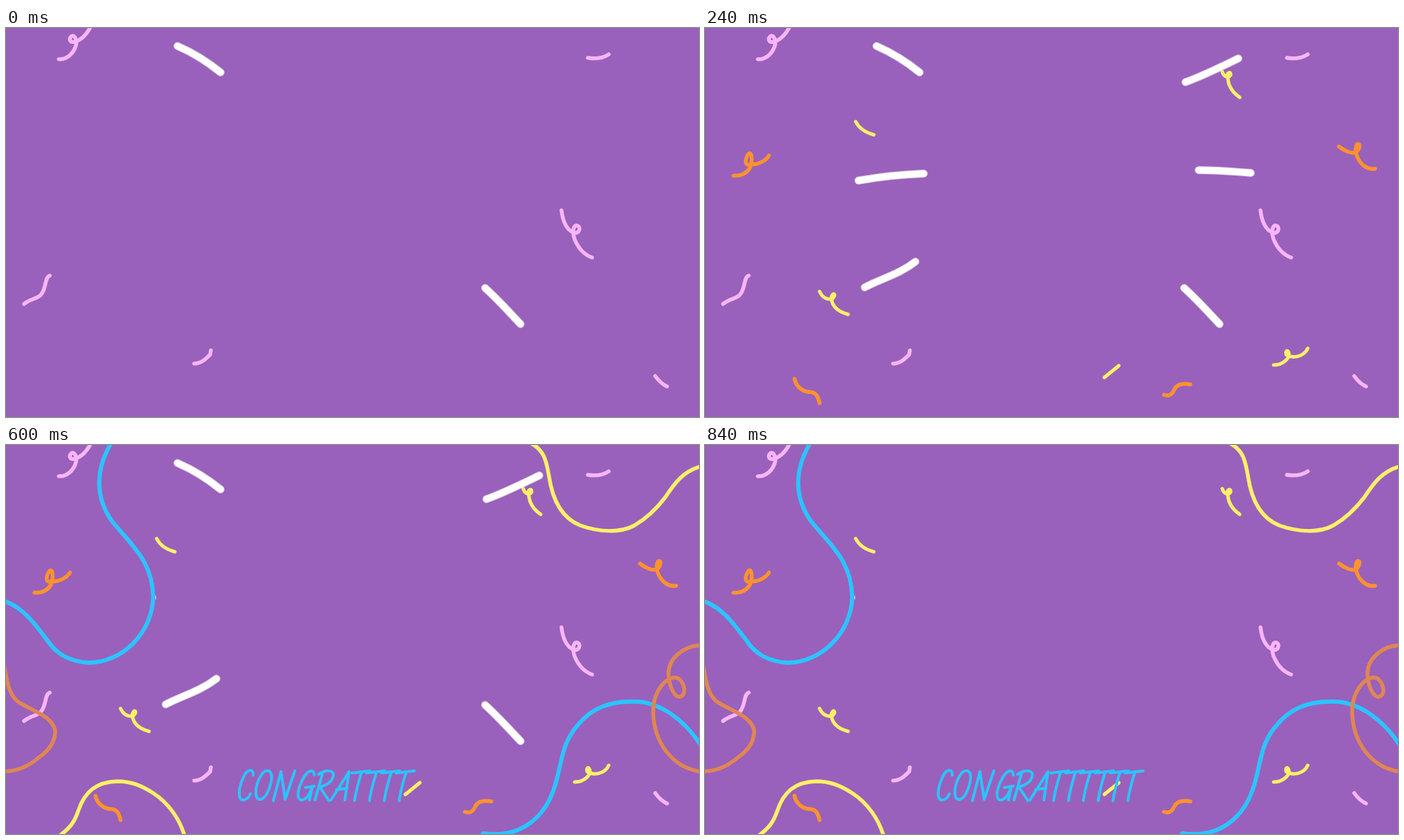
These frames come from a looping animation (998x561 px, 1200 ms). An HTML page with a canvas:

```html
<!DOCTYPE html>
<html lang="en">
<head>
<meta charset="utf-8">
<title>Congrats</title>
<style>
html, body { margin: 0; width: 100%; height: 100%; overflow: hidden; background: #9961bb; }
canvas { display: block; }
</style>
</head>
<body>
<canvas id="stage" width="998" height="561" role="img" aria-label="Congrats with confetti"></canvas>
<script>
const ctx = document.getElementById('stage').getContext('2d');
const STEP = 120, LOOP = 1200, LAST = 7;
const PURPLE = '#9961bb', PINK = '#f9b5fa', YELLOW = '#fff069', ORANGE = '#ff922e';
const BLUE = '#2bc4ff', COPPER = '#e08653', WHITE = '#fff';

// Each layer is painted in order while its step range is active.
const layers = [];
function add(color, width, from, to, ...paths) {
  for (const d of paths) layers.push({ color, width, from, to, path: new Path2D(d) });
}

add(PINK, 5.5, 0, LAST,
  'M76 45C88 46 98 36 101 24C102 14 98 10 94 12C90 16 92 21 98 20C108 18 116 9 121 0',
  'M838 43C850 45 859 44 868 38',
  'M800 263C802 280 808 291 817 295C825 298 829 288 823 285C817 283 815 294 819 305C824 317 833 327 844 331',
  'M271 484C281 484 288 477 294 471L295 465',
  'M935 502C940 509 945 514 952 517');
const squiggle = 'M26 398C36 390 44 391 50 385C59 375 55 360 63 357';
add(PINK, 5.5, 0, 2, squiggle);
add(PINK, 5.5, 3, 3, 'M55 379C58 370 57 360 63 357');
add(PINK, 5.5, 4, LAST, squiggle);

add(ORANGE, 5.5, 1, LAST,
  'M41 213C55 214 66 206 67 193C68 182 65 177 61 184C57 193 58 198 65 197C78 197 88 191 92 184',
  'M913 171C922 178 932 182 938 179C945 172 943 165 939 168C934 176 939 190 948 198C953 202 959 204 965 203',
  'M129 506C131 518 142 525 152 525C161 526 163 533 165 541',
  'M661 529C669 532 673 528 676 521C680 513 688 512 699 514');

add(YELLOW, 5, 2, LAST,
  'M217 135C222 145 232 151 243 154',
  'M745 63C747 70 753 73 757 68C758 62 750 63 753 73C754 85 760 93 770 100',
  'M165 380C169 389 177 393 184 390C190 384 184 380 182 388C182 404 195 410 206 413',
  'M575 504L596 487',
  'M819 486C831 486 841 478 841 470C840 463 835 465 837 471C845 477 862 475 868 462');

function addRay(from, to, d) {
  add('rgba(255,255,255,.6)', 11.5, from, to, d);
  add(WHITE, 9.5, from, to, d);
}
addRay(0, 6, 'M247 26C270 36 288 47 309 64');
addRay(0, 6, 'M690 375C708 391 723 408 741 427');
addRay(1, 5, 'M692 78C715 70 745 55 768 44');
addRay(1, 5, 'M230 374C255 361 280 355 303 337');
addRay(2, 4, 'M221 220C250 215 285 211 315 210');
addRay(2, 4, 'M711 205C740 205 760 207 786 209');
add('#d9c4e6', 1.5, 5, LAST, 'M215.5 218V222');

add(BLUE, 6, 3, LAST,
  'M151 -2C128 37 129 76 152 109C177 141 211 165 212 219C211 270 168 314 119 314C90 312 72 301 59 281C42 259 25 234 -3 225',
  'M687 560C740 568 777 538 791 490C802 452 800 430 825 402C845 378 873 369 905 370C940 370 976 395 1000 432');
add(COPPER, 7, 3, 3, 'M934 372L933 376');
add(COPPER, 5.5, 4, LAST,
  'M-2 320C2 350 8 365 20 372C40 384 68 392 71 413C70 430 60 442 48 450C33 463 18 470 -3 471',
  'M1000 289C975 290 953 308 954 332C956 352 964 365 971 363C980 360 978 345 969 337C955 329 932 352 932 385C933 430 960 465 1000 471');
add(YELLOW, 5.5, 5, LAST,
  'M78 563C92 552 98 545 104 528C113 500 130 486 160 485C180 485 195 491 212 502C235 517 250 540 257 563',
  'M757 -2C775 8 778 22 782 45C787 80 800 105 827 116C855 126 885 127 905 116C922 106 936 93 949 76C963 55 975 38 1000 31');

// Hand lettering: C, O, N, G, R, A, then a growing run of T.
add(BLUE, 4, 3, LAST,
  'M356 476C357 466 347 467 342 479C335 494 333 511 341 512C346 512 350 508 352 503',
  'M378 470C368 467 359 490 360 503C361 516 372 513 378 498C383 486 385 472 378 470',
  'M385 513L396 471L402 511L416 470',
  'M444 476C444 466 434 469 428 481C419 497 418 512 426 512C433 511 438 502 441 493M431 494L444 492M441 493L437 512',
  'M456 473L445 512M450 475C462 467 474 469 471 478C469 487 460 491 452 493L465 513',
  'M468 512L494 471L488 512M476 497L491 495');
const letterT = new Path2D('M498 473L524 470M512 472C508 485 504 498 502 513');
const SPACING = 21.4;
const tCount = [0, 0, 0, 1, 2, 4, 5, 6];

function stroke({ color, width, path }) {
  ctx.strokeStyle = color;
  ctx.lineWidth = width;
  ctx.stroke(path);
}

function draw(step) {
  ctx.fillStyle = PURPLE;
  ctx.fillRect(0, 0, 998, 561);
  ctx.lineCap = ctx.lineJoin = 'round';
  layers.filter(l => step >= l.from && step <= l.to).forEach(stroke);
  for (let i = 0; i < tCount[step]; i++) {
    ctx.save();
    ctx.translate(i * SPACING, 0);
    stroke({ color: BLUE, width: 4, path: letterT });
    ctx.restore();
  }
}

function tick() {
  draw(Math.min(LAST, Math.floor(performance.now() % LOOP / STEP)));
  requestAnimationFrame(tick);
}
tick();
</script>
</body>
</html>
```
